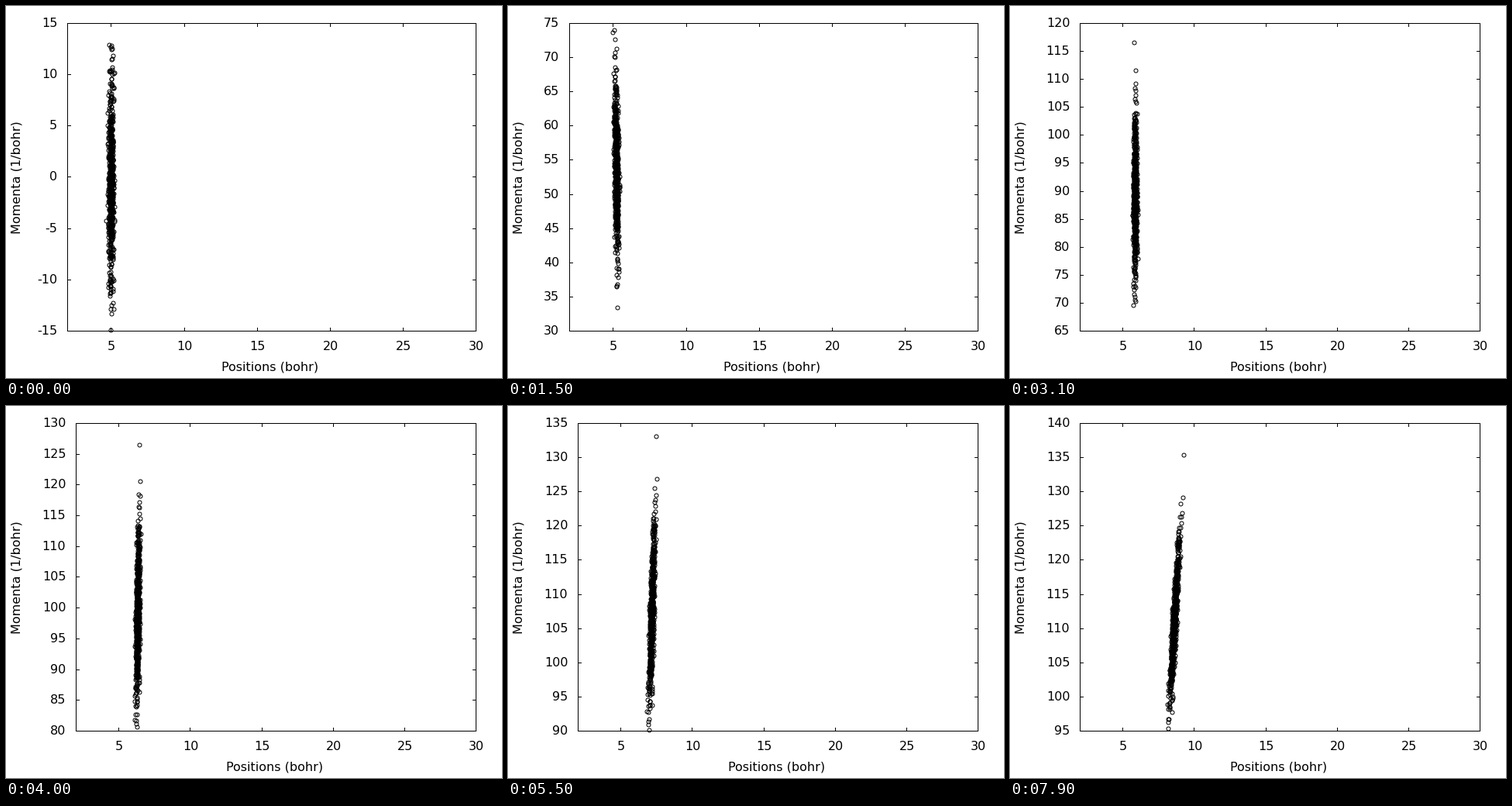
Write a matplotlib script that moves like this. It is 640 by 480 pixels and loops after 8000 ms.

```python
import numpy as np
import matplotlib.pyplot as plt
from matplotlib.animation import FuncAnimation

W, H, DPI = 640, 480, 80
FRAMES, INTERVAL = 80, 100
PX = 72 / DPI                      # one pixel in points
RIGHT, TOP, BOTTOM = 606, 22, 419
XMIN, XMAX, STEP = 2, 30, 5

plt.rcParams["font.family"] = "DejaVu Sans"
plt.rcParams["font.size"] = 16 * PX

# Wave packet pushed away by an exponential wall V ~ exp(-A (x - 5))
A, P0, C = 1.149, 111.6, 3.14e-4


def trajectory(x0, p0, t):
    """Exact position and momentum of each particle at time t."""
    p_end = np.sqrt(p0**2 + P0**2 * np.exp(-A * (x0 - 5)))
    phi = np.arctanh(p0 / p_end)
    u = C * p_end * t + phi
    x = x0 + 2 / A * np.log(np.cosh(u) / np.cosh(phi))
    return x, p_end * np.tanh(u)


def make_cloud(n=640):
    """Gaussian cloud kept inside the momentum range of its outermost members."""
    leader = [(4.66, -4.3)]
    edge = np.array([(4.742, 5), (4.87, 12.9), (4.98, -14.9),
                     (5.195, -12.9), (5.244, -2.9)])
    pts = np.random.default_rng(7).normal((5, 0), (0.098, 5.1), (n, 2))
    t = np.arange(FRAMES)[:, None]
    p_edge = trajectory(*edge.T, t)[1]
    lo, hi = p_edge.min(1, keepdims=True), p_edge.max(1, keepdims=True)
    p = trajectory(*pts.T, t)[1]
    inside = ((p > lo) & (p < hi)).all(axis=0)
    return np.vstack([leader, edge, pts[inside]]).T


X0, MOM0 = make_cloud()

fig = plt.figure(figsize=(W / DPI, H / DPI), dpi=DPI, facecolor="white")
ax = fig.add_axes([0, 0, 1, 1])


def pixel(v):
    """Centre of the pixel nearest to v."""
    return np.round(v) + 0.5


def line(xs, ys):
    ax.plot(pixel(np.array(xs)), pixel(np.array(ys)), color="black", lw=PX,
            snap=False, antialiased=False, solid_capstyle="projecting",
            solid_joinstyle="miter")


def label(x, y, s, ha="center", **kw):
    ax.text(x, y, s, ha=ha, va="baseline", color="black", **kw)


def draw(i):
    ax.clear()
    ax.set(xlim=(0, W), ylim=(H, 0))
    ax.axis("off")

    x, p = trajectory(X0, MOM0, i)
    lo = int(np.floor(p.min() / STEP)) * STEP
    hi = int(np.ceil(p.max() / STEP)) * STEP
    left = 90 if hi >= 100 else 79

    def to_x(v):
        return left + (v - XMIN) / (XMAX - XMIN) * (RIGHT - left)

    def to_y(v):
        return BOTTOM - (v - lo) / (hi - lo) * (BOTTOM - TOP)

    line([left, RIGHT, RIGHT, left, left], [TOP, TOP, BOTTOM, BOTTOM, TOP])
    for v in range(5, XMAX + 1, 5):
        tx = to_x(v)
        line([tx, tx], [BOTTOM, BOTTOM - 4])
        line([tx, tx], [TOP, TOP + 4])
        label(tx + 0.8, 443.8, str(v))
    for v in range(lo, hi + 1, STEP):
        ty = to_y(v)
        line([left, left + 4], [ty, ty])
        line([RIGHT, RIGHT - 4], [ty, ty])
        label(left - 12.7, round(ty) + 5.2, str(v), ha="right")

    label((left + RIGHT) / 2 - 1.8, 470.8, "Positions (bohr)")
    label(18.5, 221.5, "Momenta (1/bohr)", rotation=90,
          rotation_mode="anchor")

    ax.scatter(pixel(to_x(x)), pixel(to_y(p)), s=(5 * PX)**2, marker="o",
               facecolors="none", edgecolors="black", linewidths=PX,
               snap=False, zorder=3)
    return []


anim = FuncAnimation(fig, draw, frames=FRAMES, interval=INTERVAL,
                     init_func=lambda: [], repeat=True, repeat_delay=0)
plt.show()
```
